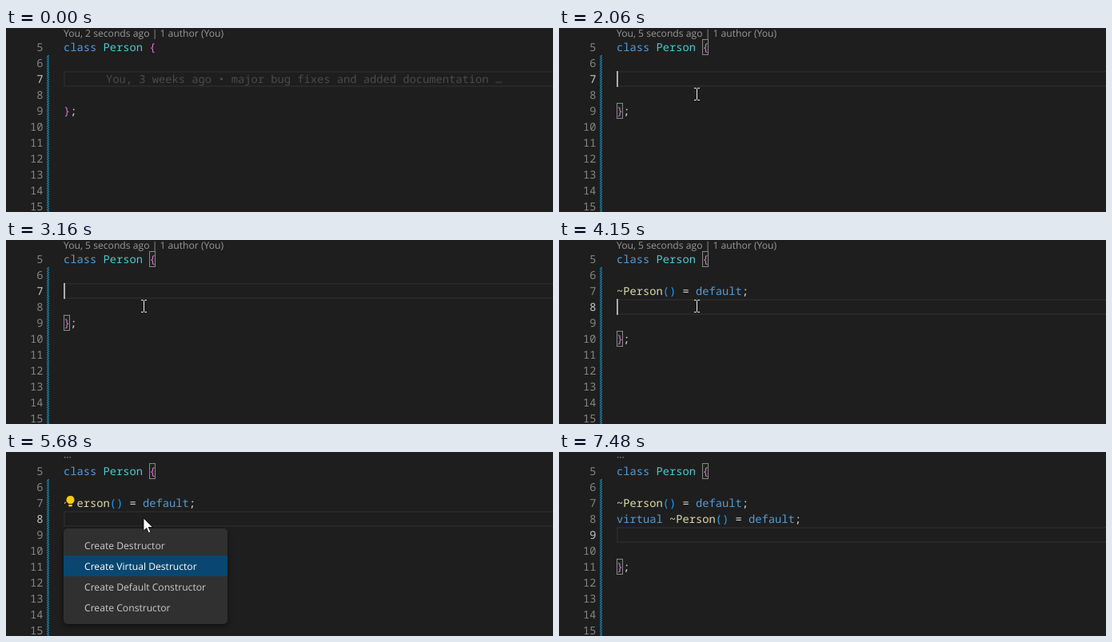
These frames come from a looping animation (684x231 px, 7.56 s). An HTML page:

```html
<!DOCTYPE html>
<html lang="en">
<head>
<meta charset="utf-8">
<title>Class editor</title>
<style>
  html, body { margin: 0; width: 100%; height: 100%; overflow: hidden; background: #1e1e1e; }
  svg { display: block; width: 684px; height: 231px; }
  text { white-space: pre; text-rendering: geometricPrecision; }
  .code { font: 13.75px "Noto Sans Mono", monospace; fill: #d4d4d4; }
  .ui { font: 12.15px "Open Sans", sans-serif; fill: #ccc; }
  .num { fill: #858585; text-anchor: end; }
  .num.on { fill: #c6c6c6; }
  .key { fill: #569cd6; }
  .type { fill: #4ec9d0; }
  .fn { fill: #dcdcaa; }
  .brace { fill: #da70d6; }
  .paren { fill: #179fff; }
  .blame { fill: #4b4b4b; }
  .lens { fill: #999; }
  .match { fill: #00640019; stroke: #888; }
  .menu { fill: #303031; filter: drop-shadow(0 2px 3px #0008); }
  .pick { fill: #094771; }
  .picked { fill: #fff; }
</style>
</head>
<body>
<svg viewBox="0 0 684 231">
  <defs>
    <pattern id="hatch" x="51" y="34" width="3" height="3" patternUnits="userSpaceOnUse">
      <path d="M-1 1L1 -1M-.5 3.5L3.5 -.5M2 4L4 2" stroke="#1b91b8" stroke-width="1.15"/>
    </pattern>
  </defs>
  <rect x="51" y="34" width="3" height="197" fill="url(#hatch)"/>
  <g id="view"></g>
</svg>
<script>
(() => {
  const LOOP = 7560, LEFT = 72, CHAR = 8.25, ROW = 20, ITEM = 26;
  const BLAME = 'You, 3 weeks ago • major bug fixes and added documentation';
  const ITEMS = ['Create Destructor', 'Create Virtual Destructor',
    'Create Default Constructor', 'Create Constructor', 'Move to cpp'];

  const start = {
    line: 7, added: 0, lens: 'You, 2 seconds ago | 1 author (You)', blame: BLAME + ' …',
    lit: false, caret: false, menu: 0, pick: 0, mouse: null
  };
  const beam = (x, y) => ({ mouse: ['beam', x, y] });
  const arrow = (x, y) => ({ mouse: ['arrow', x, y] });

  // Each step changes part of the state at a given time.
  const steps = [[0, start]];
  for (let i = 0; i < 8; i++) {
    const p = i / 7, q = (1 - p) ** 2;
    steps.push([590 + 70 * i, beam(172 + 234 * q, 83 + 38 * q - 9 * p * Math.sin(Math.PI * p))]);
  }
  steps.push(
    [1350, { line: 8, blame: '', caret: true }],
    [1410, { lit: true }],
    [1670, { blame: BLAME }],
    [1860, { line: 7, blame: '' }],
    [1930, { lens: 'You, 5 seconds ago | 1 author (You)' }],
    [2330, { blame: BLAME }],
    [2400, { menu: 5, caret: false, ...arrow(170.5, 82) }],
    [3160, { menu: 0, blame: '', caret: true, ...beam(172, 83) }],
    [3230, { added: 1, line: 8 }],
    [3620, { caret: false }],
    [4150, { caret: true }],
    [4680, { caret: false }],
    [5010, beam(173, 84)],
    [5140, { caret: true }],
    [5340, { menu: 4, caret: false, ...arrow(171.5, 83) }],
    [5600, { pick: 1 }],
    [5680, { lens: '···' }],
    [5950, { menu: 0, pick: 0, ...beam(172, 83) }],
    [6020, { added: 2, line: 9, caret: true }],
    [6480, { caret: false, ...beam(173, 83) }]
  );
  for (let i = 1; i < 6; i++) {
    const q = (i / 5) ** 1.5;
    steps.push([6540 + 68 * i, beam(173 + 396 * q, 83 + 138 * q)]);
  }
  steps.push([6940, { mouse: null, caret: true }], [7480, { caret: false }]);

  const states = [];
  steps.forEach(([, change], i) => states.push({ ...states[i - 1], ...change }));

  const rowTop = line => 14 + (line - 5) * ROW;
  const rect = (x, y, w, h, attrs) => `<rect x="${x}" y="${y}" width="${w}" height="${h}" ${attrs}/>`;
  const text = (x, y, cls, body) => `<text x="${x}" y="${y}" class="${cls}">${body}</text>`;
  const code = (line, body, x = LEFT, cls = '') => text(x, rowTop(line) + 15, 'code ' + cls, body);
  const span = (cls, body) => `<tspan class="${cls}">${body}</tspan>`;
  const dtor = span('fn', '~Person') + span('paren', '()') + ' = ' + span('key', 'default') + ';';
  const match = (col, line) =>
    rect(Math.floor(LEFT + col * CHAR) + .5, rowTop(line) + .5, 7, ROW - 1, 'class="match"');

  function bulb(line) {
    const y = rowTop(line);
    return rect(75, y + 1, 13, 18, 'fill="#1e1e1e"') +
      `<path fill="#fc0" d="M80.5 ${y + 1}a5 5 0 0 1 3 9q-.7 .6-.7 1.5v2q0 1-1 1h-2.6q-1 0-1-1v-2q0-.9-.7-1.5a5 5 0 0 1 3-9z"/>` +
      `<path stroke="#1e1e1e" d="M78 ${y + 11.5}h5"/>`;
  }

  function menu(s) {
    const y = rowTop(s.line) + 22;
    let out = rect(LEFT, y, 205, s.menu * ITEM + 16, 'rx="5" class="menu"');
    out += rect(LEFT, y + 8 + s.pick * ITEM, 205, ITEM, 'class="pick"');
    for (let i = 0; i < s.menu; i++)
      out += text(98, y + 25.5 + i * ITEM, i === s.pick ? 'ui picked' : 'ui', ITEMS[i]);
    return out;
  }

  function pointer([kind, x, y]) {
    const d = kind === 'beam'
      ? 'M-3.5 -7.5h2.5l1 1l1 -1h2.5M0 -6.5v13M-3.5 7.5h2.5l1 -1l1 1h2.5'
      : 'M0 0v16l3.7 -3.5l2.6 6l2.6 -1.1l-2.6 -5.9h5.2z';
    const paint = kind === 'beam' ? 'fill="none" stroke="#eee"' : 'fill="#fff" stroke="#000" stroke-width=".8"';
    const snap = kind === 'beam' ? .5 : 0;
    return `<path transform="translate(${Math.round(x - snap) + snap} ${Math.round(y)})" d="${d}" ${paint}/>`;
  }

  function draw(s) {
    const end = 9 + s.added;
    let out = rect(LEFT + 1, rowTop(s.line) + 1, 640, ROW - 2, 'fill="none" stroke="#282828" stroke-width="2"');
    out += text(LEFT, 11, 'ui lens', s.lens);
    for (let n = 5; n < 16; n++) out += code(n, n, 46.5, n === s.line ? 'num on' : 'num');
    if (s.lit) out += match(13, 5) + match(0, end);
    out += code(5, span('key', 'class') + ' ' + span('type', 'Person') + ' ' + span('brace', '{'));
    if (s.added > 0) out += code(7, dtor);
    if (s.added > 1) out += code(8, span('key', 'virtual') + ' ' + dtor);
    out += code(end, span('brace', '}') + ';');
    if (s.blame) out += code(s.line, s.blame, 125, 'blame');
    if (s.caret) out += rect(LEFT, rowTop(s.line), 2, ROW, 'fill="#aeafad"');
    if (s.menu) out += bulb(s.line - 1) + menu(s);
    if (s.mouse) out += pointer(s.mouse);
    return out;
  }

  const view = document.getElementById('view');
  const began = performance.now();
  let shown = -1;
  function tick() {
    const t = (performance.now() - began) % LOOP;
    let i = steps.length - 1;
    while (steps[i][0] > t) i--;
    if (i !== shown) view.innerHTML = draw(states[shown = i]);
    requestAnimationFrame(tick);
  }
  tick();
})();
</script>
</body>
</html>
```
